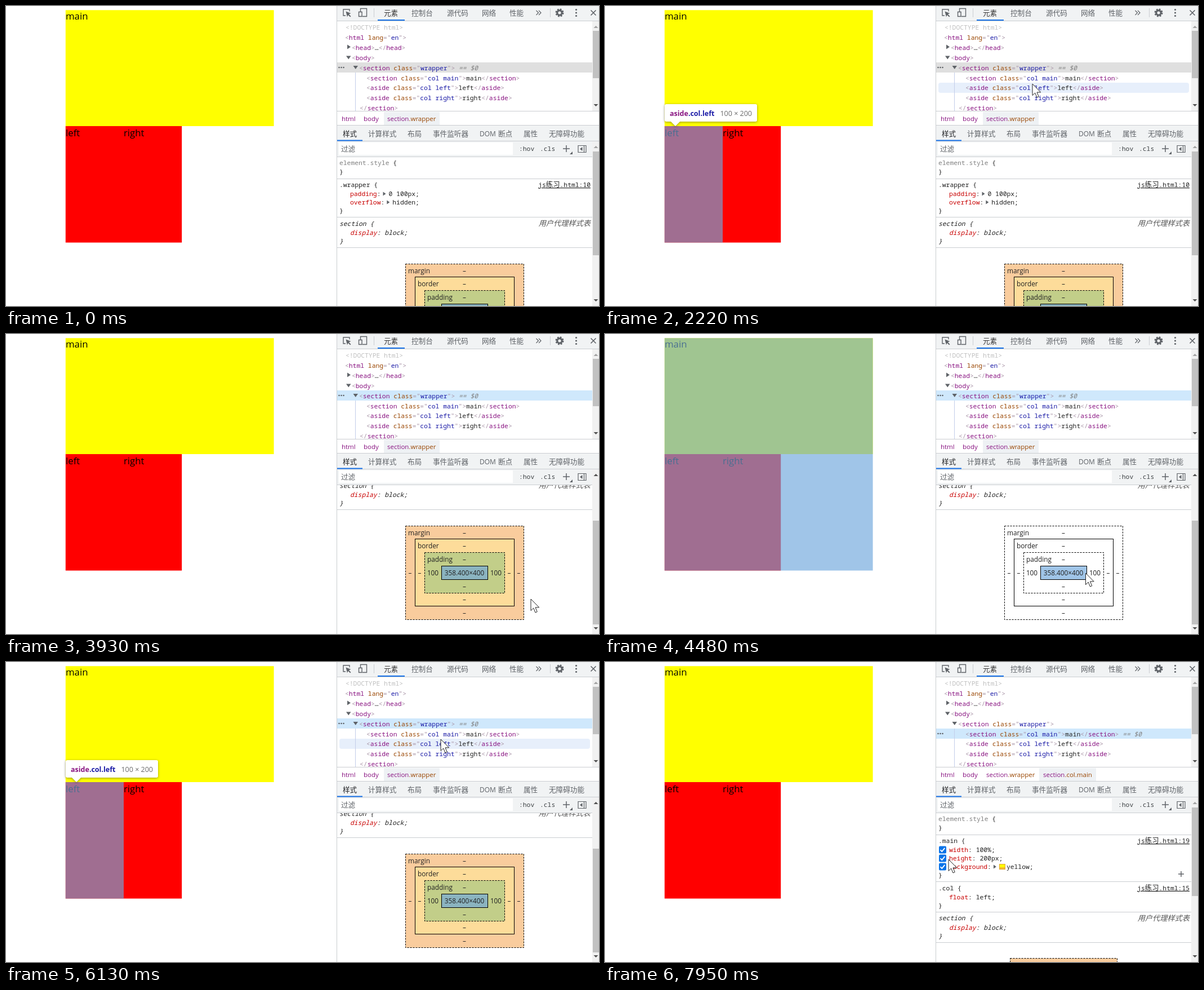
An HTML page for the animation above (8000 ms loop, 1053 by 532 pixels).

```html
<!DOCTYPE html>
<html lang="zh">
<head>
<meta charset="utf-8">
<style>
html, body { margin: 0; width: 100%; height: 100%; overflow: hidden; background: #fff; }
svg { display: block; }
text { white-space: pre; }
.m { font: 11.35px 'Noto Sans Mono', 'Noto Sans CJK SC', monospace; }
.u { font: 11.5px 'Open Sans', sans-serif; }
.b { font: 11.8px 'Open Sans', sans-serif; }
.p { font: 16.8px 'Open Sans', sans-serif; }
.c { font: 12.6px 'Noto Sans CJK SC', 'Noto Sans CJK', sans-serif; }
.t { font: 12.5px 'Open Sans', sans-serif; }
.i { font-style: italic; }
.link { text-decoration: underline 1px; }
.tip { filter: drop-shadow(0 1px 2px rgba(0, 0, 0, .4)); }
</style>
</head>
<body>
<svg id="stage" width="1053" height="532" viewBox="0 0 1053 532"></svg>
<script>
const svg = document.getElementById('stage');
const LOOP = 8000, CHAR = 6.81;
const PURPLE = '#881280', BROWN = '#994500', NAVY = '#1a1aa6', PALE = '#a894a6';
const GRAY = '#5f6368', LINE = '#cacdd1', BAR = '#f1f3f4', BLUE = '#1a73e8', RED = '#c80000', INK = '#222';
const TINT = { pad: 'rgba(147,196,125,.55)', content: 'rgba(111,168,220,.66)' };

// pointer moves come in bursts: start, end, number of steps
const bursts = [[1050, 1050, 1], [1200, 1750, 8], [2010, 2630, 10], [2830, 3580, 10], [3790, 4550, 12],
  [4620, 4690, 2], [5620, 6170, 9], [6370, 6370, 1], [6570, 6640, 2], [6900, 7660, 12], [7730, 7950, 4]];
const path = [[1050, 905, 508], [1200, 900, 485], [1436, 865, 350], [1750, 806, 222], [2010, 790, 180],
  [2217, 759, 138], [2423, 754, 114], [2630, 752, 108], [2830, 752, 109], [2997, 770, 116],
  [3330, 910, 300], [3580, 932, 478], [3928, 932, 470], [4135, 893, 432], [4273, 838, 424],
  [4411, 834, 424], [4481, 853.5, 424], [4550, 869, 423], [4690, 875, 424], [5620, 878, 410],
  [5758, 905, 350], [5895, 860, 270], [6101, 772, 137], [6170, 768, 133], [6370, 767, 134],
  [6640, 767, 134], [6900, 770, 138], [7107, 881, 239], [7315, 715, 385], [7660, 655, 488],
  [7730, 650, 470], [7950, 610, 350]];
const scrolls = [[3721, 0], [3928, 117], [7315, 117], [7522, 0]];

// page geometry
const X = 105.8, TOP = 7.3, MID = 213, END = 419.5, WIDE = 369.8, COL = 103.2;
const nodes = {
  wrapper: { tag: 'section', cls: '.wrapper', size: '558.4 × 400', box: [X, TOP, WIDE, END - TOP] },
  main: { tag: 'section', cls: '.col.main', size: '358.4 × 200', box: [X, TOP, WIDE, MID - TOP] },
  left: { tag: 'aside', cls: '.col.left', size: '100 × 200', box: [X, MID, COL, END - MID] },
  right: { tag: 'aside', cls: '.col.right', size: '100 × 200', box: [X + COL, MID, COL, END - MID] }
};
const rows = ['wrapper', 'main', 'left', 'right', 'wrapper'];
const agent = { sel: 'section', agent: true, props: [['display', 'block']] };
const inline = { sel: 'element.style', props: [] };
const sheets = {
  wrapper: [inline, { sel: '.wrapper', line: 10, props: [['padding', '0 100px', 1], ['overflow', 'hidden', 1]] }, agent],
  main: [inline,
    { sel: '.main', line: 19, props: [['width', '100%'], ['height', '200px'], ['background', 'yellow', 1, 1]] },
    { sel: '.col', line: 15, props: [['float', 'left']] }, agent]
};
const boxes = {
  wrapper: { half: [105, 88, 71, 41], pad: '100', size: '358.400×400' },
  main: { half: [95, 79, 61, 41], pad: '–', size: '358.400×200' }
};
const tabs = [['样式', 598, 588, 633], ['计算样式', 643, 633, 703], ['布局', 713, 703, 748], ['事件监听器', 758, 748, 831],
  ['断点', 874, 831, 909], ['属性', 919, 909, 954], ['无障碍功能', 964, 954, 1037]];

const rect = (x, y, w, h, fill, more = '') => `<rect x="${x}" y="${y}" width="${w}" height="${h}" fill="${fill}" ${more}/>`;
const text = (x, y, s, fill, cls, more = '') => `<text x="${x}" y="${y}" fill="${fill}" class="${cls}" ${more}>${s}</text>`;
const shape = (d, fill, more = '') => `<path d="${d}" fill="${fill}" ${more}/>`;
const stroke = (d, color, w = 1.4) => shape(d, 'none', `stroke="${color}" stroke-width="${w}"`);
const span = (fill, s, more = '') => `<tspan fill="${fill}" ${more}>${s}</tspan>`;
const hline = y => rect(588, Math.floor(y), 465, 1, LINE);

function lerp(keys, t) {
  const i = keys.findIndex(k => k[0] > t);
  if (i < 0) return keys[keys.length - 1].slice(1);
  if (i === 0) return keys[0].slice(1);
  const a = keys[i - 1], b = keys[i], f = (t - a[0]) / (b[0] - a[0]);
  return a.slice(1).map((v, n) => v + (b[n + 1] - v) * f);
}

function snap(t) {
  let out = 0;
  for (const [a, b, n] of bursts) {
    if (t < a) break;
    const step = (b - a) / (n - 1) || 1;
    out = Math.min(b, a + Math.floor((t - a) / step + .05) * step);
  }
  return out;
}

function layout(sel) {
  let y = 267.3;
  const list = sheets[sel].map(r => {
    const top = y;
    y += 38.8 + 15 * r.props.length;
    return { ...r, top, bottom: y };
  });
  return { list, boxTop: y + 28.4 };
}

function hit(x, y, s) {
  const h = { ring: -1 };
  if (y >= 100 && y < 186) h.node = rows[Math.floor((y - 100) / 18)];
  else if (y >= 212 && y < 240) h.tab = tabs.findIndex(b => x >= b[2] && x < b[3]);
  else if (y > 268) {
    const py = y + s.scroll, { list, boxTop } = layout(s.sel);
    h.rule = list.findIndex(r => py >= r.top && py < r.bottom);
    boxes[s.sel].half.forEach((w, i) => {
      const inset = 23.7 * i;
      if (Math.abs(x - 814.5) < w && py > boxTop + inset && py < boxTop + 166 - inset) h.ring = i;
    });
  }
  return h;
}

function page(s, h) {
  let o = rect(...nodes.main.box, '#ff0') + rect(X, MID, 2 * COL, END - MID, '#f00') +
    text(106, 24, 'main', '#000', 'p') + text(106, 231, 'left', '#000', 'p') + text(209, 231, 'right', '#000', 'p');
  const n = h.node || (h.ring >= 0 && s.sel);
  if (!n) return o;
  if (n === 'wrapper' && (h.node || h.ring === 2)) {
    for (const x of [X - COL, X + WIDE]) o += rect(x, TOP, COL, END - TOP, TINT.pad);
  }
  if (h.node || h.ring === 3) o += rect(...nodes[n].box, TINT.content);
  return o;
}

function tooltip(name) {
  const { tag, cls, size, box } = nodes[name];
  const x = name === 'wrapper' ? 3 : Math.round(box[0]), up = box[1] > 50;
  const edge = up ? box[1] : box[1] + box[3], y = Math.round(up ? edge - 39 : edge + 8);
  const base = up ? y + 31 : y;
  return `<g class="tip">${rect(x, y, 166, 31, '#fff', 'rx="3" id="tipbox"')}` +
    shape(`M${x + 11} ${base}h16L${x + 19} ${edge}z`, '#fff') + '</g>' +
    text(x + 9, y + 21, span(PURPLE, tag, 'font-weight="700"') + span(NAVY, cls, 'font-weight="700"') +
      span('#6b6b6b', size, 'dx="10"'), INK, 't', 'id="tiptext"');
}

function toolbar() {
  let o = rect(587, 0, 466, 532, '#fff') + rect(588, 0, 465, 26, BAR) + hline(26);
  o += stroke('M610 9.5V6H599V17H603', GRAY) + shape('M603.5 9.5l9 3.5-3.6 1.6 3.6 3.6-1.4 1.4-3.6-3.6-1.6 3.5z', GRAY);
  o += stroke('M629.5 10V4.5H640.5V18.5H633M626.5 10.5h5.5v8h-5.5z', GRAY);
  o += rect(653, 4, 1, 16, LINE) + rect(966, 4, 1, 16, LINE) + rect(660, 24, 48, 2, BLUE);
  [['元素', 671], ['控制台', 720], ['源代码', 783], ['网络', 845], ['性能', 894]].forEach(([s, x], i) =>
    o += text(x, 16.7, s, i ? GRAY : '#333', 'c'));
  o += stroke('M941.5 8l4 4-4 4M946 8l4 4-4 4', GRAY, 1.2);
  o += `<g fill="none" stroke="${GRAY}"><circle cx="983" cy="12" r="4.2" stroke-width="3.2"/>
    <circle cx="983" cy="12" r="6.2" stroke-width="2.6" stroke-dasharray="2.7 2.17"/></g>`;
  for (const y of [6.5, 12, 17.5]) o += `<circle cx="1012.5" cy="${y}" r="1.6" fill="${GRAY}"/>`;
  return o + stroke('M1038.5 7.5l9 9m0-9l-9 9', GRAY, 1.6);
}

function scrollbar(top, bottom, thumb, len, scrolled) {
  return rect(1041, top, 12, bottom - top, '#f1f1f1') + rect(1042, thumb, 11, len, '#c1c1c1') +
    shape(`M1043.5 ${top + 12}h8l-4-4z`, scrolled ? '#505050' : '#a3a3a3') +
    shape(`M1043.5 ${bottom - 12}h8l-4 4z`, '#505050');
}

const open = (tag, attr, val) => span(PALE, '&lt;') + span(PURPLE, tag) +
  (attr ? span(BROWN, ' ' + attr) + span(PALE, '="') + span(NAVY, val) + span(PALE, '"') : '') + span(PALE, '&gt;');
const close = tag => span(PALE, '&lt;/') + span(PURPLE, tag) + span(PALE, '&gt;');

function tree(s, h) {
  const selY = s.sel === 'main' ? 118 : 100;
  let o = rect(588, selY, 453, 18, s.focus ? '#cfe8fc' : '#dfdfdf');
  const row = rows.indexOf(h.node);
  if (h.node && h.node !== s.sel && row > 0) o += rect(592, 100 + 18 * row, 445, 18, 'rgba(56,121,217,.12)', 'rx="4"');
  for (const x of [591.5, 595.5, 599.5]) o += `<circle cx="${x}" cy="${selY + 9}" r="1.3" fill="${GRAY}"/>`;
  const tail = span('#808080', ' == $0', 'font-style="italic"');
  const mark = name => s.sel === name ? tail : '';
  const item = (name, tag) => open(tag, 'class', 'col ' + name) + name + close(tag) + mark(name);
  const lines = [
    [603, span('#c0c0c0', '&lt;!DOCTYPE html&gt;')],
    [602, open('html', 'lang', 'en')],
    [614, open('head') + '…' + close('head')],
    [614, open('body')],
    [627, open('section', 'class', 'wrapper') + mark('wrapper')],
    [640, item('main', 'section')], [640, item('left', 'aside')], [640, item('right', 'aside')],
    [628, close('section')]];
  lines.forEach(([x, l], i) => o += text(x, 42 + 17.9 * i, l, INK, 'm'));
  o += shape('M606 68.5v8l6-4z', GRAY) + shape('M604 88.5h8.5l-4.25 6z', GRAY) + shape('M616.5 106h8.5l-4.25 6z', GRAY);
  o += rect(620, 118, 1, 68, '#c3cdea');
  return `<g clip-path="url(#treeclip)">${o}</g>` + scrollbar(27, 186, 44, 84);
}

function crumbs(s) {
  const crumb = (x, n) => text(x, 204, span(PURPLE, 'section') + span(BROWN, n), INK, 'u');
  const main = s.sel === 'main';
  return hline(186) + (main ? rect(771, 188, 101, 23, '#eef1f4') : rect(671, 188, 99, 23, '#eef1f4')) +
    text(596, 204, 'html', PURPLE, 'u') + text(635, 204, 'body', PURPLE, 'u') +
    crumb(677, '.wrapper') + (main ? crumb(778, '.col.main') : '');
}

function paneHead(h) {
  let o = rect(588, 211, 465, 56, BAR) + hline(211);
  tabs.forEach(([s, x, a, b], i) => {
    const on = h.tab === i, ink = on || !i ? '#202124' : GRAY;
    if (on) o += rect(a, 212, b - a, 27, '#efeaea');
    if (i === 4) o += text(841, 230.5, 'DOM', ink, 'u', 'style="font-size:12px"');
    o += text(x, 230.7, s, ink, 'c');
  });
  o += hline(239) + rect(588, 237.5, 45, 2, BLUE) + rect(591, 242, 309, 22, '#fff') + text(595, 258, '过滤', GRAY, 'c');
  o += text(911, 257, ':hov', '#3c4043', 'm', 'font-weight="700"') + text(948, 257, '.cls', '#3c4043', 'm', 'font-weight="700"');
  o += stroke('M989 253h12M995 247v12', GRAY, 1.5) + shape('M1006 258v5h-5z', GRAY);
  o += stroke('M1016 247.5h14v12h-14zM1026.5 247.5v12', GRAY, 1.2) + shape('M1023.5 250v7l-4.5-3.5z', GRAY);
  return o + hline(267);
}

function rule(r, on) {
  const style = r.agent ? 'm i' : 'm', base = r.top + 15;
  const first = r.sel === 'element.style' ? span('#808080', r.sel) : r.sel;
  let o = text(592, base - .3, first + ' {', INK, style);
  if (r.agent) o += text(1038, base, '用户代理样式表', '#555', 'c i', 'text-anchor="end" style="font-size:13.2px"');
  if (r.line) o += text(1038, base, `js<tspan font-size="12.4">练习</tspan>.html:${r.line}`, INK, 'm link', 'text-anchor="end"');
  r.props.forEach(([name, val, arrow, swatch], i) => {
    const y = r.top + 31 + 15 * i, end = 611 + CHAR * (name.length + 1);
    let x = end + (arrow ? 14 : CHAR);
    o += text(611, y, span(RED, name) + ':', INK, style);
    if (arrow) o += shape(`M${end + 4} ${y - 7.5}v7l5-3.5z`, GRAY);
    if (swatch) {
      o += rect(x + .5, y - 8.5, 10, 9, '#ff0', 'stroke="#e0a030"') + rect(x + 1, y - 3, 9, 3, '#f5b82e');
      x += 13;
    }
    o += text(x, y, val + ';', INK, style);
    if (on && r.line) o += rect(593, y - 10.5, 13, 13, '#0b74e8', 'rx="2"') + stroke(`M595.5 ${y - 4}l2.8 3 5-6.3`, '#fff', 1.9);
  });
  o += text(592, r.top + 31 + 15 * r.props.length, '}', INK, style) + hline(r.bottom);
  if (on && r.line) o += stroke(`M1018 ${r.bottom - 14}h10m-5-5v10`, GRAY, 1.5);
  return o;
}

function boxModel(sel, top, ring) {
  const { half, pad, size } = boxes[sel];
  const fills = ['rgba(246,178,107,.66)', 'rgba(255,229,153,.66)', TINT.pad, TINT.content];
  const names = ['margin', 'border', 'padding'];
  const mid = (x, y, s) => text(x, y + 4.3, s, INK, 'b', 'text-anchor="middle"');
  let o = '';
  half.forEach((w, i) => {
    const y = Math.floor(top + 23.7 * i), h = Math.round(166 - 47.2 * i);
    o += rect(814.5 - w, y + .5, 2 * w, h, ring < 0 || ring === i ? fills[i] : '#fff',
      `stroke="#000" ${i % 2 ? '' : 'stroke-dasharray="3 2"'}`);
    if (i === 3) return;
    const side = (w + half[i + 1]) / 2, label = i === 2 ? pad : '–';
    o += text(814 - w + 5, y + 17, names[i], INK, 'b') + mid(814, y + 13, '–') + mid(814, y + h - 11.5, '–');
    o += mid(814 - side, top + 83.5, label) + mid(814 + side, top + 83.5, label);
  });
  return o + mid(814, top + 83.5, size);
}

function styles(s, h) {
  const { list, boxTop } = layout(s.sel);
  const body = list.map((r, i) => rule(r, h.rule === i)).join('') + boxModel(s.sel, boxTop, h.ring);
  const [travel, thumb] = s.sel === 'main' ? [62, 157] : [73, 184];
  return `<g clip-path="url(#paneclip)"><g transform="translate(0 ${-s.scroll})">${body}</g></g>` +
    scrollbar(240, 532, 258 + s.scroll / 117 * travel, thumb, s.scroll > 0);
}

const defs = `<clipPath id="treeclip">${rect(588, 27, 453, 159, '#000')}</clipPath>
  <clipPath id="paneclip">${rect(588, 268, 453, 264, '#000')}</clipPath>`;
let last = '';

function draw(time) {
  const t = snap(time);
  const s = { sel: t >= 6570 ? 'main' : 'wrapper', focus: t >= 2830, scroll: Math.round(lerp(scrolls, t)[0]) };
  const shown = t >= 1050, [x, y] = lerp(path, t);
  const h = shown ? hit(x, y, s) : { ring: -1 };
  let o = defs + page(s, h) + (h.node ? tooltip(h.node) : '') + toolbar() + tree(s, h) + crumbs(s) + paneHead(h) + styles(s, h);
  o += rect(587, 0, 1, 532, LINE);
  if (shown) o += shape('M0 0V20.5L4.7 16 8 24 11.2 22.6 8 14.9H14.7Z', '#fff',
    `stroke="#222" transform="translate(${x.toFixed(1)} ${y.toFixed(1)})"`);
  if (o === last) return;
  svg.innerHTML = last = o;
  const label = document.getElementById('tiptext');
  if (label) document.getElementById('tipbox').setAttribute('width', label.getComputedTextLength() + 28);
}

const begin = performance.now();
function frame() {
  draw((performance.now() - begin) % LOOP);
  requestAnimationFrame(frame);
}
draw(0);
requestAnimationFrame(frame);
</script>
</body>
</html>
```
